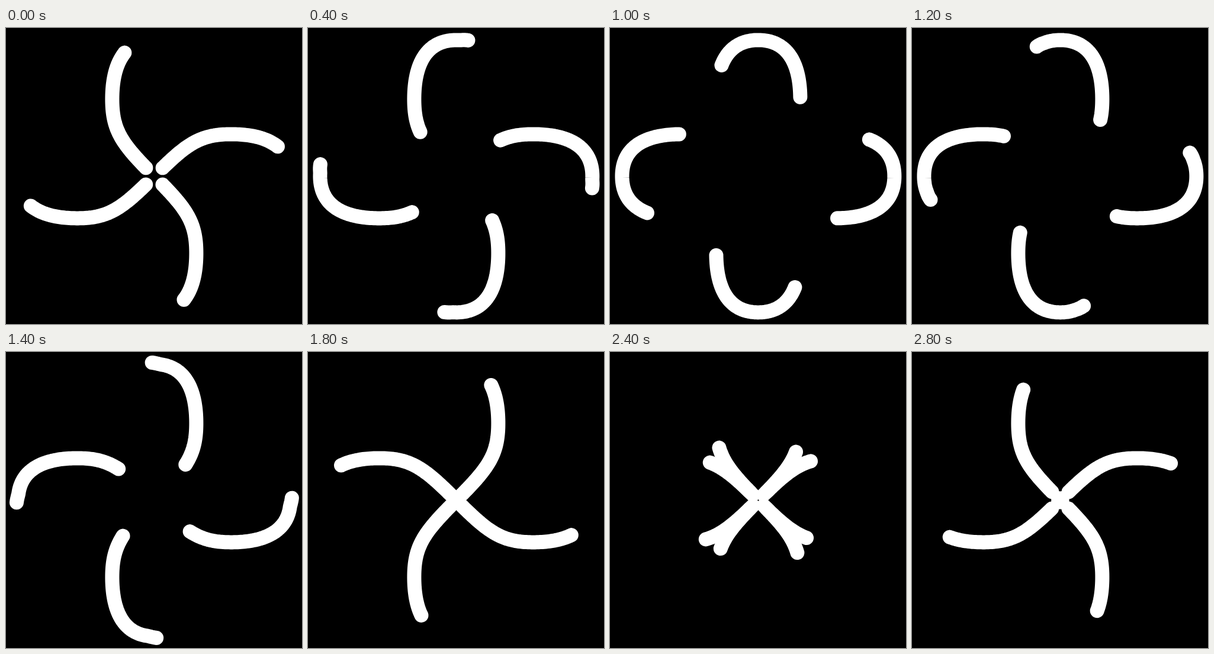
An HTML page for the animation above (2.9 s loop, 500 by 500 pixels).

```html
<!DOCTYPE html>
<html lang="en">
<head>
<meta charset="utf-8">
<title>Pinwheel loader</title>
<style>
  html, body { margin: 0; width: 100%; height: 100%; overflow: hidden; background: #000; }
  svg { display: block; width: 100%; height: 100%; }
</style>
</head>
<body>
<svg viewBox="0 0 500 500">
  <defs>
    <path id="petal" d="M0 0C-54 -54 -71 -76 -71 -130C-71 -196 -46 -230 0 -230C46 -230 71 -196 71 -130C71 -76 54 -54 0 0"/>
    <path id="dash" fill="none" stroke="#fff" stroke-width="24" stroke-linecap="round" stroke-linejoin="round"/>
  </defs>
  <g transform="translate(250.4 250.4)">
    <use href="#dash"/>
    <use href="#dash" transform="rotate(90)"/>
    <use href="#dash" transform="rotate(180)"/>
    <use href="#dash" transform="rotate(270)"/>
  </g>
</svg>
<script>
const petal = document.getElementById('petal');
const dash = document.getElementById('dash');
const total = petal.getTotalLength();

const LOOP = 2900, STEP = 100;
const DASH = 216, START = 20;
const SPEED = 19.2, SLOW_STEPS = 24, STEPS = LOOP / STEP;
const GAP_IN = 20, GAP_OUT = 13;   // the stroke stops short of the centre

// Steady travel, then a quicker run back to the start
function tailAt(step) {
  const slow = SPEED * Math.min(step, SLOW_STEPS);
  const rest = total - SPEED * SLOW_STEPS;
  const fast = rest * Math.max(0, step - SLOW_STEPS) / (STEPS - SLOW_STEPS);
  return (START + slow + fast) % total;
}

// Ends of the dash rise a little as they round the tip of the petal
function point(s, ends) {
  const p = petal.getPointAtLength(s);
  const near = Math.min(...ends.map(e => Math.abs(s - e)));
  const tip = Math.exp(-(((s - total / 2) / 40) ** 2));
  const lift = 2.6 * tip * Math.max(0, 1 - near / 14);
  return p.x.toFixed(2) + ' ' + (p.y - lift).toFixed(2);
}

function stroke(from, to, ends) {
  if (to < from) return '';
  const n = Math.max(1, Math.ceil((to - from) / 3));
  const pts = [];
  for (let i = 0; i <= n; i++) pts.push(point(from + (to - from) * i / n, ends));
  return 'M' + pts.join('L');
}

function body(from, to, ends) {
  return stroke(Math.max(from, GAP_IN), Math.min(to, total - GAP_OUT), ends);
}

function draw(ms) {
  const tail = tailAt(Math.floor((ms % LOOP) / STEP));
  const end = tail + DASH, head = end % total;
  const ends = [tail, head];
  const main = end <= total
    ? body(tail, end, ends)
    : body(tail, total, ends) + body(0, head, ends);
  dash.setAttribute('d', main + stroke(tail, tail, ends) + stroke(head, head, ends));
}

let begin;
function tick(now) {
  if (begin === undefined) begin = now;
  draw(Math.max(0, now - begin));
  requestAnimationFrame(tick);
}
draw(0);
requestAnimationFrame(tick);
</script>
</body>
</html>
```
